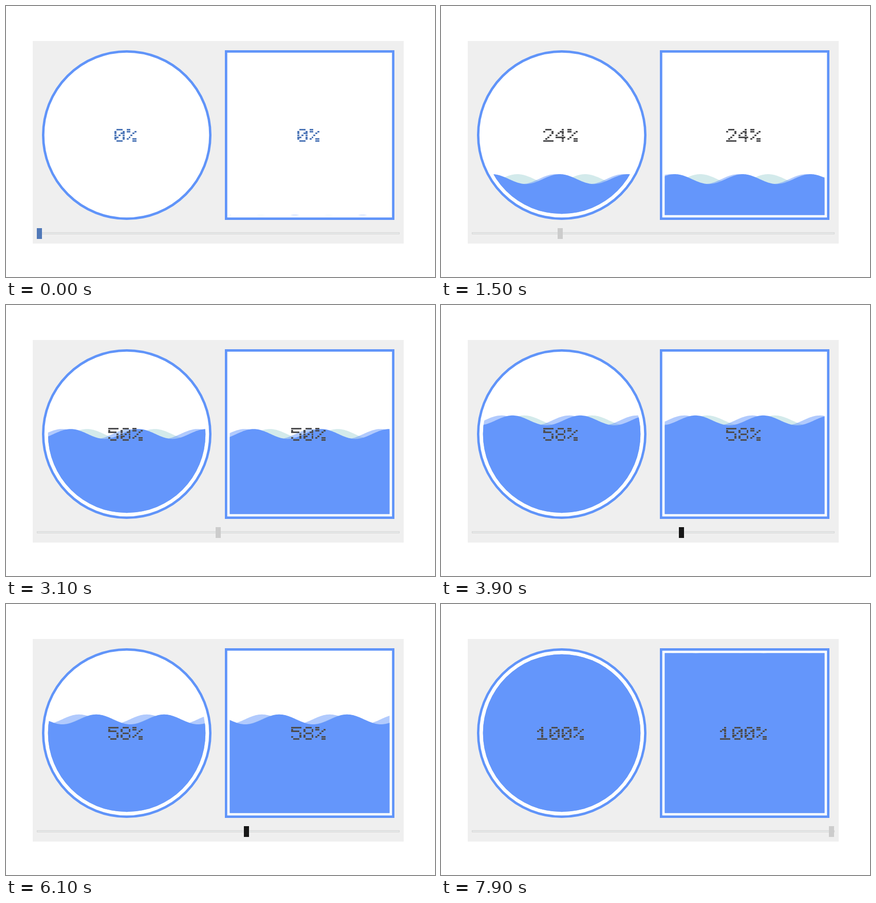
Animation of 835 by 527 pixels, one loop 8 s. Source, as an HTML page with a canvas:

```html
<!DOCTYPE html>
<html lang="en">
<head>
<meta charset="utf-8">
<title>Liquid gauges</title>
<style>
html, body { margin: 0; width: 100%; height: 100%; overflow: hidden; background: #fff; }
canvas { display: block; }
</style>
</head>
<body>
<canvas id="stage" width="835" height="527"></canvas>
<script>
const ctx = document.getElementById('stage').getContext('2d');
const LOOP = 8000, STEP = 100;
const PERIOD = 132, AMPLITUDE = 9.6, DRIFT = 50 / 9;
const BORDER = '#6094f9', BORDER_WIDTH = 4.7, ACCENT = '#5078b8';
const WAVE_COLORS = ['rgba(168,213,216,.5)', 'rgba(100,150,251,.5)', '#6496fb'];

// Dot-matrix glyphs on a grid of 5 columns and 7 rows: is the dot at (x, y) lit?
const side = x => x % 4 === 0;
const eight = (x, y) => side(x) !== (y % 3 === 0);
const six = (x, y) => y < 3
  ? x + y === 2 || (y === 0 && x === 3)
  : eight(x, y) || (x === 0 && y === 3);
const GLYPHS = {
  0: (x, y) => side(x) !== (y % 6 === 0) || x + y === 5,
  1: (x, y) => y === 6 || x === 2 || x + y === 2,
  2: (x, y) => y === 6 || (y < 2 ? eight(x, y) : x + y === 6),
  3: (x, y) => eight(x, y) && !(x === 0 && (y === 2 || y === 4)),
  4: (x, y) => y === 4 || x === 3 || x + y === 3,
  5: (x, y) => y < 3
    ? y === 0 || x === 0 || (y === 2 && x < 4)
    : (y > 4 ? eight(x, y) : x === 4),
  6: six,
  7: (x, y) => y === 0 || x === Math.max(1, 5 - y),
  8: eight,
  9: (x, y) => six(4 - x, 6 - y),
  '%': (x, y) => x + y === 5 || (x < 2 && y < 2) || (x > 2 && y > 4)
};

// Slider drag: [seconds, percent]
const DRAG = [[0.6, 0], [1.5, 24], [2.6, 40], [3.5, 58], [6.3, 58], [6.9, 71], [7.4, 100]];

function percentAt(t) {
  const next = DRAG.findIndex(([time]) => time > t);
  if (next === 0) return 0;
  if (next < 0) return 100;
  const [t0, p0] = DRAG[next - 1], [t1, p1] = DRAG[next];
  return Math.round(p0 + (p1 - p0) * (t - t0) / (t1 - t0));
}

function thumbColor(t) {
  if (t < 0.1) return ACCENT;
  const hovering = t < 0.3 || (t >= 3.6 && t < 6.2);
  return hovering ? '#171717' : '#cccccc';
}

function rect(color, x, y, w, h) {
  ctx.fillStyle = color;
  ctx.fillRect(x, y, w, h);
}

// Layers run back to front; each one drifts faster, the rearmost in antiphase.
function drawWave(color, layer, t, percent, offset) {
  const phase = layer === 0 ? PERIOD / 2 : 0;
  const crest = 74.3 + phase + DRIFT * (layer + 1) * t + offset;
  const middle = 415.8 - 3.3 * percent;
  const left = 65 + offset, right = 405 + offset;
  ctx.beginPath();
  ctx.moveTo(left, 420);
  for (let x = left; x <= right; x += 2) {
    ctx.lineTo(x, middle - AMPLITUDE * Math.cos(2 * Math.PI * (x - crest) / PERIOD));
  }
  ctx.lineTo(right, 420);
  ctx.fillStyle = color;
  ctx.fill();
}

function drawLabel(text, center, color) {
  const dot = 3.93, line = 3.67, pitch = 6 * dot;
  [...text].forEach((char, i) => {
    const left = center + (i - text.length / 2) * pitch;
    for (let y = 0; y < 7; y++) {
      for (let x = 0; x < 5; x++) {
        if (!GLYPHS[char](x, y)) continue;
        const x0 = Math.round(left + x * dot), x1 = Math.round(left + (x + 1) * dot);
        rect(color, x0, Math.round(239 + y * line), x1 - x0, 3);
      }
    }
  });
}

function drawGauge(t, percent, offset, shape, liquidRadius) {
  const center = 235 + offset;
  ctx.beginPath();
  shape(center, 165 - BORDER_WIDTH / 2);
  ctx.fillStyle = '#fff';
  ctx.fill();
  ctx.strokeStyle = BORDER;
  ctx.lineWidth = BORDER_WIDTH;
  ctx.stroke();

  ctx.save();
  ctx.beginPath();
  shape(center - 0.001, liquidRadius);
  ctx.clip();
  WAVE_COLORS.forEach((color, layer) => drawWave(color, layer, t, percent, offset));
  ctx.restore();
  drawLabel(percent + '%', center - 0.4, t < 0.1 ? ACCENT : '#4d4d4f');
}

const circle = (x, radius) => ctx.arc(x, 251, radius, 0, 2 * Math.PI);
const square = (x, radius) => ctx.rect(x - radius, 251 - radius, 2 * radius, 2 * radius);

function drawSlider(t, percent) {
  rect('#d6d6d6', 60, 440, 706, 4);
  rect('#e7eaea', 61, 441, 704, 2);
  rect(thumbColor(t), Math.round(60 + 6.95 * percent), 432, 10, 21);
}

function draw(t) {
  const percent = percentAt(t);
  rect('#fff', 0, 0, 835, 527);
  rect('#efefef', 52, 68, 722, 394);
  drawGauge(t, percent, 0, circle, 153.3);
  drawGauge(t, percent, 356, square, 155.5);
  drawSlider(t, percent);
}

const start = performance.now();
function tick() {
  const elapsed = (performance.now() - start) % LOOP;
  draw(Math.floor(elapsed / STEP) * STEP / 1000);
  requestAnimationFrame(tick);
}
tick();
</script>
</body>
</html>
```
